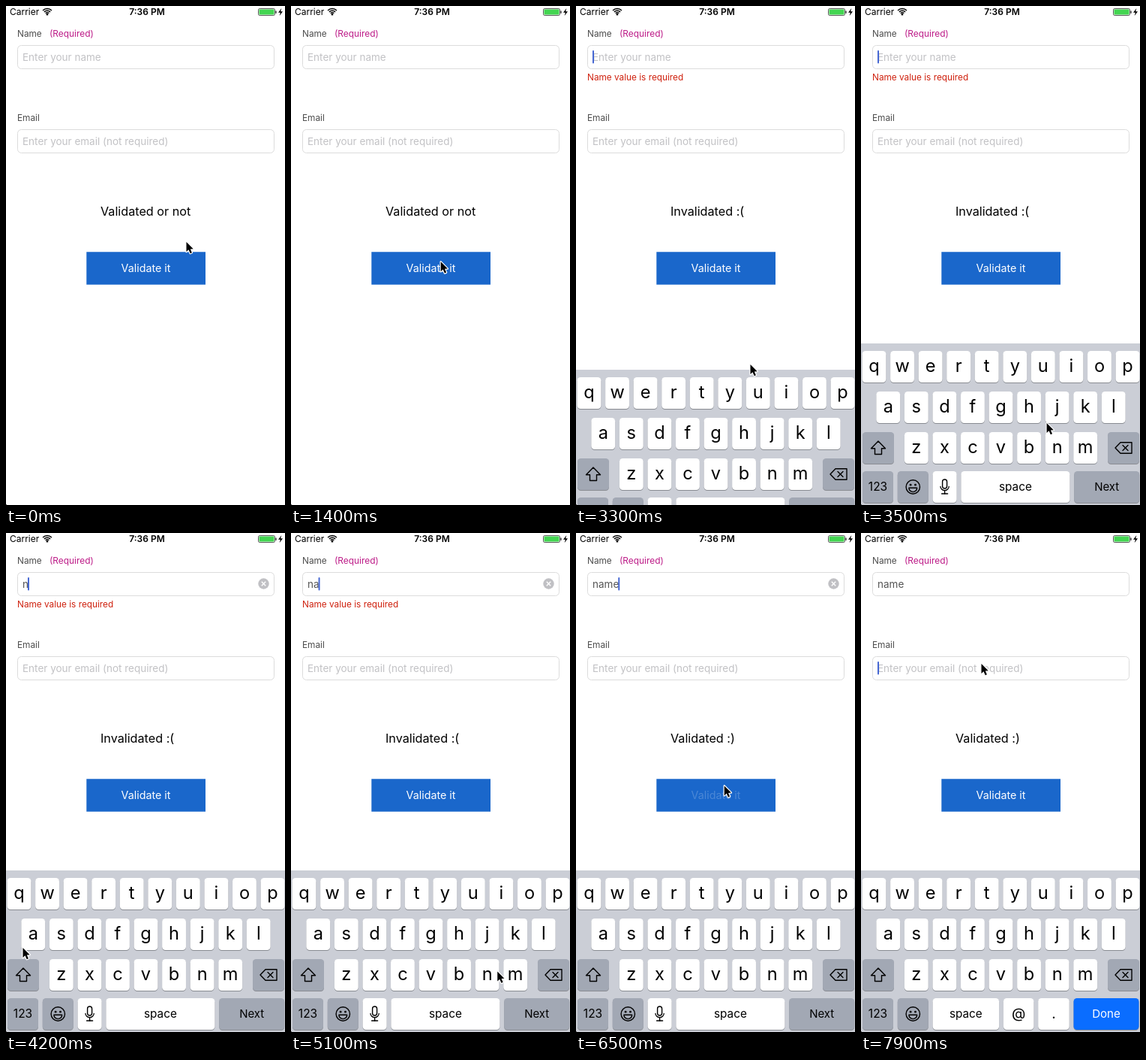
Animation of 372 by 664 pixels, one loop 8 s. Source, as an HTML page with a canvas:

```html
<!DOCTYPE html>
<html lang="en">
<head>
<meta charset="utf-8">
<title>Form validation</title>
<style>
html, body { margin: 0; width: 100%; height: 100%; overflow: hidden; background: #fff; }
canvas { display: block; width: 372px; height: 664px; }
</style>
</head>
<body>
<canvas id="stage"></canvas>
<script>
const W = 372, H = 664, LOOP = 8000;
const canvas = document.getElementById('stage');
const ctx = canvas.getContext('2d');
const dpr = window.devicePixelRatio || 1;
canvas.width = W * dpr;
canvas.height = H * dpr;

const FONT = 'Inter, Roboto, "Liberation Sans", sans-serif';
const LIGHT = '#fff', DARK = '#a2a8b4', BLUE = '#0a6dff';

// Keyboard grid
const ROWS = ['qwertyuiop', 'asdfghjkl', 'zxcvbnm'];
const TOP = 449, PITCH = 37.56, KEY_W = 31.8, KEY_H = 42, GAP = 5.8;

// Story, in ms
const PRESS = 110, FADE = 250;
const FOCUS_NAME = 2950, FOCUS_EMAIL = 7600;
const clicks = [1890, 6380], FAIL = 2000, PASS = 6490;
const typing = [['n', 3840], ['a', 4440], ['m', 5200], ['e', 5720]];

const clamp = v => Math.max(0, Math.min(1, v));
const mix = (a, b, p) => a + (b - a) * p;
const smooth = p => p * p * (3 - 2 * p);
const easeInOut = p => p < 0.5 ? 2 * p * p : 1 - 2 * (1 - p) * (1 - p);

function keySpot(ch) {
  const row = ROWS.findIndex(r => r.includes(ch));
  const fromMiddle = ROWS[row].indexOf(ch) - (ROWS[row].length - 1) / 2;
  return { x: 186.5 + PITCH * fromMiddle, y: TOP + 10 + 54 * row };
}

// Pointer stops: time, x, y; it rests on each key while pressing it
const stops = [
  [0, 240, 313], [850, 202, 337], [2000, 196, 342], [2600, 168, 88], [2900, 168, 73],
  [3300, 232, 476], [3700, 262, 631], [4200, 22, 551],
  [6300, 196, 336], [6650, 198, 335], [7300, 168, 190], [7900, 160, 173], [LOOP, 160, 173]
];
for (const [ch, time] of typing) {
  const { x, y } = keySpot(ch);
  stops.push([time, x - 8, y + 19], [time + PRESS, x - 8, y + 19]);
}
stops.sort((a, b) => a[0] - b[0]);

function text(str, x, y, size, color, align = 'left', weight = 400) {
  ctx.font = `${weight} ${size}px ${FONT}`;
  ctx.textAlign = align;
  ctx.fillStyle = color;
  ctx.fillText(str, x, y);
}

function paint(fill, stroke, width = 1.4) {
  if (fill) { ctx.fillStyle = fill; ctx.fill(); }
  if (stroke) { ctx.strokeStyle = stroke; ctx.lineWidth = width; ctx.stroke(); }
}

function box(x, y, w, h, r, fill, stroke, width) {
  ctx.beginPath();
  ctx.roundRect(x, y, w, h, r);
  paint(fill, stroke, width);
}

function disc(x, y, r, fill, stroke, width) {
  ctx.beginPath();
  ctx.arc(x, y, r, 0, Math.PI * 2);
  paint(fill, stroke, width);
}

function arc(x, y, r, a, b, width) {
  ctx.beginPath();
  ctx.arc(x, y, r, a, b);
  paint(null, '#000', width);
}

function shape(points, fill, stroke, width) {
  ctx.beginPath();
  for (const [x, y] of points) ctx.lineTo(x, y);
  ctx.closePath();
  paint(fill, stroke, width);
}

function cross(x, y, r, color) {
  for (const s of [-1, 1]) shape([[x - r, y - r * s], [x + r, y + r * s]], null, color);
}

// Runs a drawing with the origin moved to x, y
function at(x, y, drawing) {
  ctx.save();
  ctx.translate(x, y);
  ctx.lineJoin = 'round';
  drawing();
  ctx.restore();
}

function statusBar() {
  text('Carrier', 5, 12, 12, '#000');
  for (const r of [3.2, 5.8, 8.4]) arc(55, 12, r, -Math.PI * 0.75, -Math.PI * 0.25, 1.5);
  disc(55, 11.2, 1.3, '#000');
  text('7:36 PM', 188, 12, 12, '#000', 'center', 600);
  box(336.5, 3.5, 22, 9, 1.8, null, '#333', 0.8);
  box(337.5, 4.5, 20, 7, 0.8, '#43d551');
  box(359.3, 6.3, 1.4, 3.6, 0.7, '#333');
  at(366, 8, () => shape([[1.3, -5], [-3, 0.8], [-0.2, 0.8], [-1.3, 5], [3, -0.8], [0.2, -0.8]], '#000'));
}

function field(y, value, hint, focused, caretOn) {
  box(15.5, y + 0.5, 342, 31, 5, null, '#dcdcdc', 1);
  text(value || hint, 22, y + 21, 13.5, value ? '#555' : '#c2c2c5');
  if (!focused) return;
  if (caretOn) {
    const w = value ? ctx.measureText(value).width - 1 : 0;
    box(22 + w, y + 7, 2, 17.5, 1, '#4567d4');
  }
  if (value) {
    disc(343.5, y + 15.5, 7.2, '#c0c0c4');
    cross(343.5, y + 15.5, 2.7, '#fff');
  }
}

// The button title dims while held, then fades back
function titleAlpha(t) {
  const down = clicks.findLast(c => t >= c);
  return down === undefined ? 1 : mix(0.18, 1, clamp((t - down - PRESS) / FADE));
}

function form(t) {
  const typed = typing.filter(p => t >= p[1] + PRESS);
  const value = typed.map(p => p[0]).join('');
  const onEmail = t >= FOCUS_EMAIL, onName = t >= FOCUS_NAME && !onEmail;
  const since = onEmail ? FOCUS_EMAIL : typed.length ? typed.at(-1)[1] + PRESS : FOCUS_NAME;
  const caretOn = (t - since) % 1100 < 750;

  text('Name', 15, 41, 11.8, '#4c4c4c');
  text('(Required)', 58, 41, 11.9, '#bd1c88');
  field(52, value, 'Enter your name', onName, caretOn);
  if (t >= FAIL && t < PASS) text('Name value is required', 15, 99, 11.8, '#cf210e');
  text('Email', 15, 153, 11.8, '#4c4c4c');
  field(164, '', 'Enter your email (not required)', onEmail, caretOn);

  const result = t < FAIL ? 'Validated or not' : t < PASS ? 'Invalidated :(' : 'Validated :)';
  text(result, 126, 278.5, 16.2, '#000');
  box(107.3, 327.2, 158.7, 43.6, 0, '#1a67cb');
  ctx.globalAlpha = titleAlpha(t);
  text('Validate it', 186.5, 354, 14.3, '#fff', 'center');
  ctx.globalAlpha = 1;
}

function shiftIcon() {
  const half = [[0, -9], [9.5, 0.7], [4.5, 0.7], [4.5, 8.5]];
  const mirror = half.map(([x, y]) => [-x, y]).reverse();
  shape([...half, ...mirror], null, '#000');
}

function deleteIcon() {
  shape([[-11, 0], [-4, -7.3], [11, -7.3], [11, 7.3], [-4, 7.3]], null, '#000');
  cross(2.5, 0, 3.5, '#000');
}

function smileIcon() {
  disc(0, 0, 9.2, null, '#000');
  for (const x of [-3.2, 3.2]) disc(x, -2.8, 1.4, '#000');
  ctx.beginPath();
  ctx.arc(0, 1.2, 5.4, 0, Math.PI);
  ctx.closePath();
  paint(null, '#000');
}

function micIcon() {
  box(-3, -10, 6, 12, 3, null, '#000');
  arc(0, -1, 5.7, 0, Math.PI, 1.3);
  shape([[0, 5], [0, 9]], null, '#000');
  shape([[-4, 9], [4, 9]], null, '#000');
}

// The face is a label or an icon function
function key(x, y, w, fill, face, size, color = '#000') {
  box(x, y + 1, w, KEY_H, 4.5, '#898c92');
  box(x, y, w, KEY_H, 4.5, fill);
  const cx = x + w / 2, cy = y + KEY_H / 2;
  if (typeof face === 'function') at(cx, cy, face);
  else text(face, cx, cy + size * 0.34, size, color, 'center');
}

// Enlarged letter above a pressed key
function callout(ch) {
  const { x, y } = keySpot(ch);
  const stem = KEY_W / 2, head = 29;
  ctx.save();
  ctx.shadowColor = 'rgba(0,0,0,.35)';
  ctx.shadowBlur = 6 * dpr;
  ctx.beginPath();
  ctx.moveTo(x - head, y - 40);
  ctx.arcTo(x - head, y - 56, x, y - 56, 9);
  ctx.arcTo(x + head, y - 56, x + head, y, 9);
  ctx.lineTo(x + head, y - 14);
  ctx.quadraticCurveTo(x + stem, y - 4, x + stem, y + 8);
  ctx.arcTo(x + stem, y + KEY_H, x, y + KEY_H, 4.5);
  ctx.arcTo(x - stem, y + KEY_H, x - stem, y, 4.5);
  ctx.lineTo(x - stem, y + 8);
  ctx.quadraticCurveTo(x - stem, y - 4, x - head, y - 14);
  ctx.closePath();
  paint(LIGHT);
  ctx.restore();
  text(ch, x, y - 17, 36, '#000', 'center');
}

function bottomRow(t) {
  const keys = [[41, DARK, '123', 15.5], [41, DARK, smileIcon]];
  if (t < FOCUS_EMAIL)
    keys.push([32, LIGHT, micIcon], [145, LIGHT, 'space', 15.3], [87, DARK, 'Next', 15]);
  else
    keys.push([88.5, LIGHT, 'space', 15.3], [40.5, LIGHT, '@', 19], [41.5, LIGHT, '.', 19], [87, BLUE, 'Done', 15.1, '#fff']);
  let x = 2;
  for (const [w, ...look] of keys) {
    key(x, TOP + 170, w, ...look);
    x += w + GAP;
  }
}

function keyboard(t) {
  const rise = easeInOut(clamp((t - 3015) / 400));
  if (rise === 0) return;
  at(0, Math.round((H - TOP) * (1 - rise)), () => {
    box(0, TOP, W, H - TOP, 0, '#cbced6');
    for (const ch of ROWS.join('')) {
      const { x, y } = keySpot(ch);
      key(x - KEY_W / 2, y, KEY_W, LIGHT, '', 24);
      text(ch, x, y + 27.5, 23.6, '#000', 'center');
    }
    const { y } = keySpot('z');
    key(2, y, KEY_H, DARK, shiftIcon);
    key(329, y, KEY_H, DARK, deleteIcon);
    bottomRow(t);
    for (const [ch, down] of typing) if (t >= down && t < down + PRESS) callout(ch);
  });
}

function pointer(t) {
  const i = stops.findIndex(s => s[0] > t);
  const [t0, x0, y0] = stops[i - 1], [t1, x1, y1] = stops[i];
  const p = smooth((t - t0) / (t1 - t0));
  const arrow = [[0, 0], [0, 13], [3, 10.2], [5.2, 15.2], [7.4, 14.2], [5.3, 9.5], [9.2, 9.2]];
  at(mix(x0, x1, p) + 0.5, mix(y0, y1, p) + 1, () => {
    shape(arrow, null, '#fff', 2.4);
    shape(arrow, '#000');
  });
}

function draw(t) {
  ctx.setTransform(dpr, 0, 0, dpr, 0, 0);
  box(0, 0, W, H, 0, '#fff');
  statusBar();
  form(t);
  keyboard(t);
  box(0, H - 1, 1, 1, 0, '#555');
  pointer(t);
}

const start = performance.now();
function tick(now) {
  draw(Math.max(0, now - start) % LOOP);
  requestAnimationFrame(tick);
}
draw(0);
requestAnimationFrame(tick);
</script>
</body>
</html>
```
